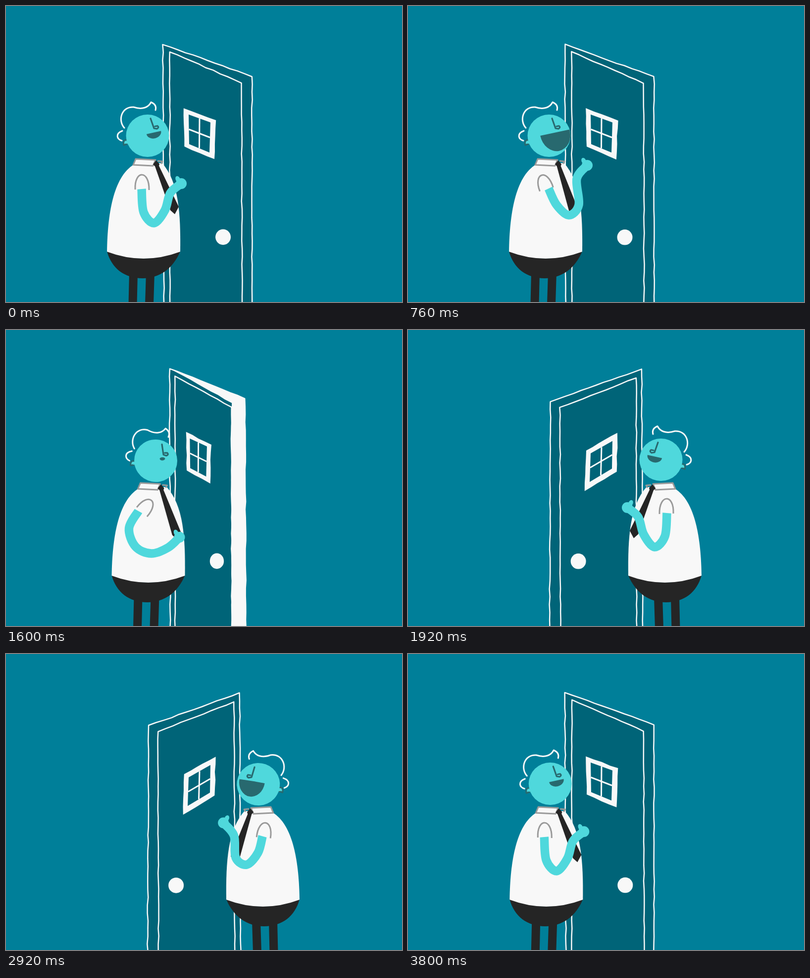
An HTML page with a canvas that plays this animation: 800 px wide and 600 px high, repeating every 3840 ms.

```html
<!DOCTYPE html>
<html lang="en">
<head>
<meta charset="utf-8">
<title>Knocking at the door</title>
<style>
html, body { margin: 0; width: 100%; height: 100%; overflow: hidden; background: #007f99; }
canvas { display: block; }
</style>
</head>
<body>
<canvas id="stage" width="800" height="600"></canvas>
<script>
const ctx = document.getElementById('stage').getContext('2d');
const LOOP = 3840, HALF = 1920, FLIP = 1718, FRAME = 40;
const BG = '#007f99', DOOR = '#006478', SKIN = '#4fd8dc', WHITE = '#f8f8f8';
const BLACK = '#252525', GRAY = '#9a9a9a', INK = '#28696f';

const lerp = (a, b, p) => a + (b - a) * p;
const clamp = v => Math.max(0, Math.min(1, v));
const smooth = p => p * p * (3 - 2 * p);

const doors = [
  {
    outer: [[317, 78], [497, 143], [497, 604], [319, 604]],
    inner: [[331, 93], [476, 156], [477, 604], [331, 604]],
    frame: [[359, 207], [424, 232], [421, 311], [361, 285]],
    glass: [[369, 220], [413, 236], [411, 297], [370, 280]],
    knob: [438.5, 468.5], pivot: 380, dir: 1
  },
  {
    outer: [[472, 79], [288, 145], [286, 604], [474, 604]],
    inner: [[461, 97], [307, 157], [308, 604], [462, 604]],
    frame: [[423, 208], [360, 244], [357, 326], [422, 287]],
    glass: [[413, 225], [369, 250], [367, 308], [412, 281]],
    knob: [344, 469], pivot: 410, dir: -1
  }
];

// Poses of the right-facing man; the arm runs from the sleeve to the fist.
const ready = {
  arm: [[274, 371], [278, 418], [299, 440], [321, 414], [332, 379], [354, 360]],
  sleeve: 0, head: [286, 263], tilt: 0, mouth: [15, 12, 0], tie: 0
};
const callOut = {
  arm: [[286, 369], [311, 397], [343, 411], [369, 393], [382, 355], [383, 316]],
  sleeve: -0.55, head: [291, 262.5], tilt: 0.14, mouth: [30, 36, 0], tie: 0.02
};
const callNear = {
  arm: [[284, 370], [300, 403], [325, 424], [345, 403], [341, 350], [362, 323]],
  sleeve: -0.32, head: [285, 263], tilt: 0, mouth: [31, 38, 0], tie: 0.07
};
const listen = {
  arm: [[258, 367], [239, 402], [252, 439], [284, 453], [318, 441], [341, 420]],
  sleeve: 0.7, head: [296, 268], tilt: 0.24, mouth: [5.5, 3.5, 3], tie: 0.06
};
const settle = { ...listen, head: [293, 265], tilt: 0.19 };

function mix(a, b, p) {
  if (Array.isArray(a)) return a.map((v, i) => mix(v, b[i], p));
  if (typeof a === 'number') return lerp(a, b, p);
  return Object.fromEntries(Object.keys(a).map(k => [k, mix(a[k], b[k], p)]));
}
const knock = mix(ready, callOut, 0.3);
const keys = [
  [0, ready], [80, ready], [160, knock], [240, ready], [320, knock], [400, ready],
  [560, callOut], [760, callNear], [920, callNear], [1200, listen], [1440, listen], [1600, settle]
];

function poseAt(h) {
  if (h >= FLIP) return ready;
  const i = keys.findIndex(k => k[0] > h);
  if (i < 0) return settle;
  const [t0, a] = keys[i - 1], [t1, b] = keys[i];
  return mix(a, b, smooth((h - t0) / (t1 - t0)));
}

let boil = 0;
const noise = n => {
  const s = Math.sin(n * 12.9898 + boil * 78.233) * 43758.5453;
  return s - Math.floor(s) - 0.5;
};

function trace(points, closed = true) {
  ctx.beginPath();
  points.forEach(([x, y], i) => i ? ctx.lineTo(x, y) : ctx.moveTo(x, y));
  if (closed) ctx.closePath();
}
function fill(points, color) {
  trace(points);
  ctx.fillStyle = color;
  ctx.fill();
}
function stroke(color, width) {
  ctx.strokeStyle = color;
  ctx.lineWidth = width;
  ctx.stroke();
}
function paint(path, color) {
  ctx.fillStyle = color;
  ctx.fill(new Path2D(path));
}
function draw(path, color, width) {
  ctx.strokeStyle = color;
  ctx.lineWidth = width;
  ctx.stroke(new Path2D(path));
}
function disc(x, y, rx, ry, color, turn = 0) {
  ctx.beginPath();
  ctx.ellipse(x, y, rx, ry, turn, 0, 7);
  ctx.fillStyle = color;
  ctx.fill();
}

function roughen(points) {
  return points.flatMap(([x, y], i) => {
    const [u, v] = points[(i + 1) % points.length];
    const n = Math.max(1, Math.round(Math.hypot(u - x, v - y) / 16));
    return Array.from({ length: n }, (_, k) => {
      const id = i * 60 + k + points[0][0];
      return [lerp(x, u, k / n) + noise(id) * 1.6, lerp(y, v, k / n) + noise(id + 500) * 1.4];
    });
  });
}

function turnAmount(h) {
  const p = h < FLIP ? (h - 1480) / (FLIP - 1480) : (1872 - h) / (1872 - FLIP);
  return Math.pow(clamp(p), 2.25);
}

function drawWindow(door, place, h, side) {
  fill(roughen(place(door.frame)), WHITE);
  const glass = place(door.glass);
  fill(glass, DOOR);
  const peek = clamp(1 - Math.abs(h - 1440) / 110);
  if (peek) {
    ctx.save();
    trace(glass);
    ctx.clip();
    const x = lerp(323, 347, smooth(peek));
    disc(side ? x : 783 - x, 274, 43, 43, '#1c99a8');
    ctx.restore();
  }
  const mid = (i, j) => mix(glass[i], glass[j], 0.5);
  trace([mid(0, 1), mid(2, 3)], false);
  stroke(WHITE, 3);
  trace([mid(0, 3), mid(1, 2)], false);
  stroke(WHITE, 3);
}

function drawDoor(side, h) {
  const door = doors[side], q = turnAmount(h);
  const place = pts => pts.map(([x, y]) => [lerp(x, door.pivot, q), y]);
  const outer = place(door.outer), inner = place(door.inner);
  if (q) {
    const far = inner[1][0] + door.dir * (21 + 29 * q);
    outer[1] = [far, outer[1][1] - Math.min(4, q * 20)];
    outer[2][0] = far + door.dir * 2;
  }
  fill(outer, DOOR);
  trace(roughen(outer));
  stroke(WHITE, 2.5);
  trace(roughen(inner));
  stroke(WHITE, 2.5);
  if (q) {
    const near = lerp(outer[1][0], inner[1][0], clamp(q / 0.15));
    const bulk = [outer[0], outer[1], outer[2], [near, 604], [near, inner[1][1] - 8]];
    fill(roughen(bulk), WHITE);
  }
  drawWindow(door, place, h, side);
  const [x, y] = door.knob;
  disc(lerp(x, door.pivot, q) + noise(3), y + noise(4), 15.5 * (1 - q * 0.4), 15.8, WHITE);
}

function drawBody(pose) {
  ctx.lineCap = 'butt';
  draw('M257.5 540L256 604M291.5 540L289.5 604', BLACK, 17);
  paint('M204 497Q278 526 352 497C338 532 310 552 276 552C240 552 213 532 204 497Z', BLACK);
  paint('M259 321C216 346 205 425 204 498Q278 526 352 498C353 420 349 356 315 318Z', WHITE);
  const collar = 'M262 310L302 312L297 324L257 322Z';
  paint(collar, WHITE);
  draw(collar, GRAY, 3);
  draw('M306 314L316 315L313 320', GRAY, 3);
  ctx.save();
  ctx.translate(303, 320);
  ctx.rotate(pose.tie);
  paint('M0 -7L7 0L6 4L46 87L38 102L29 94L-2 5L-6 1Z', BLACK);
  ctx.restore();
}

function drawArm({ arm, sleeve }) {
  ctx.save();
  ctx.translate(275, 357);
  ctx.rotate(sleeve);
  ctx.lineCap = 'butt';
  draw('M-14 15C-16 -25 15 -25 14 16', GRAY, 3);
  ctx.restore();
  ctx.beginPath();
  ctx.moveTo(...arm[0]);
  for (let i = 0; i < arm.length - 1; i++) {
    const before = arm[Math.max(0, i - 1)], a = arm[i], b = arm[i + 1];
    const after = arm[Math.min(arm.length - 1, i + 2)];
    ctx.bezierCurveTo(
      a[0] + (b[0] - before[0]) / 6, a[1] + (b[1] - before[1]) / 6,
      b[0] - (after[0] - a[0]) / 6, b[1] - (after[1] - a[1]) / 6, b[0], b[1]);
  }
  stroke(SKIN, 17.5);
  const [x, y] = arm[5];
  disc(x, y, 11, 11, SKIN);
  disc(x - 7, y - 9, 4.5, 6.5, SKIN, -0.4);
}

function drawHead({ head, tilt, mouth }) {
  ctx.save();
  ctx.translate(...head);
  ctx.rotate(tilt);
  ctx.lineCap = ctx.lineJoin = 'round';
  draw('M-47 -16C-61 -32 -52 -60 -28 -58C-10 -52 2 -58 7 -68Q19 -63 16 -52', WHITE, 3);
  draw('M-51 -10C-66 -4 -62 7 -52 10', WHITE, 3);
  disc(-43, 13, 6, 5, SKIN);
  draw('M-38 8L-46 9Q-50 12 -48 19L-41 16', INK, 3);
  disc(0, 0, 43.5, 43, SKIN);
  disc(-41, 13, 5, 3, SKIN, -0.2);
  draw('M6 -35L13 -15L19 -14Q24 -17 20 -20L15 -19', INK, 3.2);
  ctx.beginPath();
  ctx.arc(0, 0, 43.2, 0, 7);
  ctx.clip();
  ctx.translate(12.5, -6.5);
  ctx.rotate(-0.21);
  const [width, drop, rise] = mouth;
  ctx.beginPath();
  ctx.ellipse(0, 0, width, drop, 0, 0, Math.PI);
  ctx.ellipse(0, 0, width, rise, 0, Math.PI, Math.PI * 2);
  ctx.fillStyle = INK;
  ctx.fill();
  ctx.restore();
}

function drawMan(side, h) {
  const pose = poseAt(h);
  const slide = 120 * Math.exp(h < FLIP ? (h - FLIP) * 0.0215 : (FLIP - h) * 0.028);
  ctx.save();
  if (side) {
    ctx.translate(797, 0);
    ctx.scale(-1, 1);
  }
  ctx.translate(slide, 0);
  drawBody(pose);
  drawHead(pose);
  drawArm(pose);
  ctx.restore();
}

function render(now) {
  const t = Math.floor((now % LOOP) / FRAME) * FRAME;
  const h = t % HALF;
  const side = (Math.floor(t / HALF) + (h >= FLIP ? 1 : 0)) % 2;
  boil = Math.floor(t / 120);
  ctx.fillStyle = BG;
  ctx.fillRect(0, 0, 800, 600);
  ctx.lineJoin = 'round';
  drawDoor(side, h);
  drawMan(side, h);
}

function tick() {
  render(performance.now());
  requestAnimationFrame(tick);
}
tick();
</script>
</body>
</html>
```
